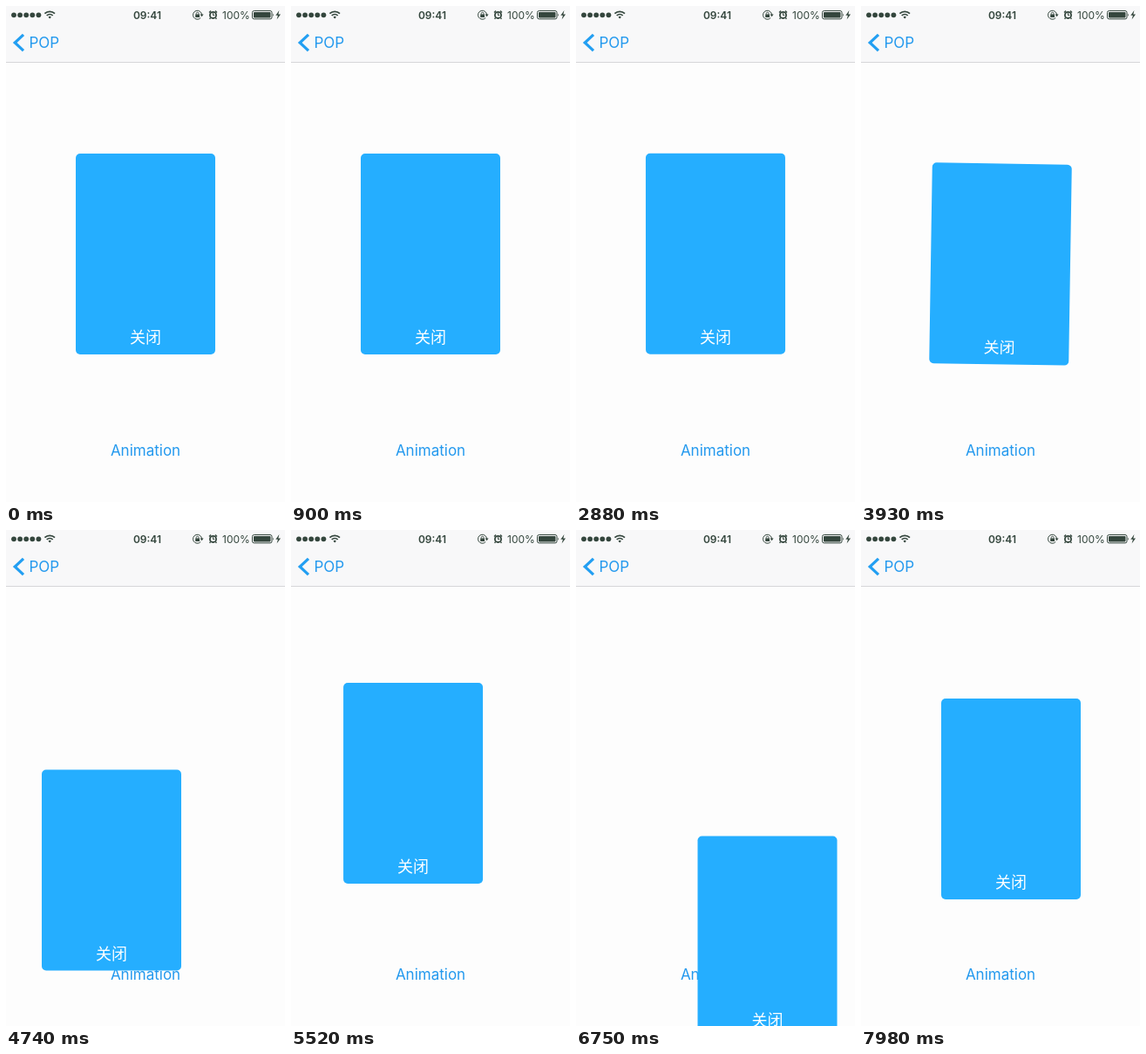
These frames come from a looping animation (320x568 px, 8 s). An HTML page:

```html
<!DOCTYPE html>
<html lang="zh">
<head>
<meta charset="utf-8">
<title>Spring card</title>
<style>
  html, body { margin: 0; width: 100%; height: 100%; overflow: hidden; background: #fdfdfd; }
  svg { display: block; width: 100vw; height: 100vh; }
  text { font-family: Inter, Roboto, sans-serif; }
  .link { font-size: 17px; fill: #2399ee; }
  .status { font-size: 12px; fill: #34463d; }
  .cjk { font: 300 18px "Noto Sans CJK SC", "Noto Sans CJK", sans-serif; fill: #fff; }
</style>
</head>
<body>
<svg viewBox="0 0 320 568">
  <defs>
    <clipPath id="bar"><rect width="320" height="64"/></clipPath>
    <filter id="blur" x="-30%" y="-30%" width="160%" height="160%"><feGaussianBlur stdDeviation="9"/></filter>
  </defs>
  <rect width="320" height="568" fill="#fdfdfd"/>
  <text class="link" x="160" y="514.6" text-anchor="middle">Animation</text>
  <g id="card">
    <rect x="-80" y="-115" width="160" height="230" rx="5" fill="#25aeff"/>
    <text class="cjk" x="0" y="102" text-anchor="middle">关闭</text>
  </g>

  <!-- translucent navigation bar -->
  <rect width="320" height="64" fill="#f8f8f9"/>
  <g clip-path="url(#bar)"><use href="#card" filter="url(#blur)" opacity=".25"/></g>
  <rect y="64" width="320" height="1" fill="#d6d6d8"/>
  <path d="M20 32.8 10.2 42 20 51.2" fill="none" stroke="#239ff2" stroke-width="3.2"/>
  <text class="link" x="26.5" y="48.2">POP</text>

  <!-- status bar -->
  <g id="dots" fill="#34463d"></g>
  <g fill="none" stroke="#34463d" stroke-width="1.7">
    <path d="M44.4 8.7a8.2 8.2 0 0 1 11.6 0M46.7 11a5 5 0 0 1 7 0"/>
    <path d="M50.2 14.6 48.5 12.7a2.4 2.4 0 0 1 3.4 0z" fill="#34463d" stroke="none"/>
    <path d="M223.2 13.6a5 5 0 1 1 1.3-3.4" stroke-width="1"/>
    <path d="M222.6 9.6h4l-2 2.6z" fill="#34463d" stroke="none"/>
    <rect x="217.2" y="9.5" width="4.8" height="3.5" fill="#34463d" stroke="none"/>
    <path d="M218.2 9.7v-1a1.4 1.4 0 0 1 2.8 0v1" stroke-width=".9"/>
    <circle cx="237.5" cy="10.4" r="3.6" stroke-width="1.8"/>
    <path d="M237.5 8v2.6h1.8" stroke-width="1"/>
    <path d="M233 7.6 235 5.6M242 7.6 240 5.6M234.6 13.4 233.6 15M240.4 13.4 241.4 15" stroke-width="1.4"/>
    <rect x="282.5" y="5.5" width="22.5" height="9.4" rx="2" stroke-width="1"/>
    <rect x="284" y="7" width="19.5" height="6.4" rx=".8" fill="#34463d" stroke="none"/>
    <path d="M306 8.5q1.6 1.7 0 3.4z" fill="#34463d" stroke="none"/>
    <path d="M313.4 5 309.3 10.8h2.6L310.6 15.4 315 9.4h-2.7z" fill="#34463d" stroke="none"/>
  </g>
  <text class="status" x="162" y="14.6" text-anchor="middle" font-weight="600">09:41</text>
  <text class="status" x="264" y="14.6" text-anchor="middle">100%</text>
</svg>
<script>
const LOOP = 8000, REST = { x: 160, y: 284 }, TRAVEL = 568, TILT = 45;
const card = document.getElementById('card');

document.getElementById('dots').innerHTML = [0, 1, 2, 3, 4]
  .map(i => `<circle cx="${9 + i * 7.1}" cy="10.3" r="2.9"/>`).join('');

// Each pair: the card leaves through the top, then drops back in.
const CLOSE_MS = 450;
const cycles = [[20, 440], [1760, 2330], [3120, 3627]];

// Finger path: time, x offset, y offset
const drag = [
  [4080, 0, 0], [4450, -26, 42], [4880, -42, 121], [5220, -34, 50], [5520, -20, 6],
  [5850, 8, 12], [6250, 32, 58], [6750, 59.5, 181.5], [7220, 40, 104], [7600, 24, 52], [7980, 12, 24],
];

const smooth = p => p * p * (3 - 2 * p);

// Remaining share of an underdamped spring's distance
function spring(ms) {
  const t = ms / 1000, damp = 0.76, w = 18.5;
  const root = Math.sqrt(1 - damp * damp), a = w * root * t;
  return Math.exp(-damp * w * t) * (Math.cos(a) + damp / root * Math.sin(a));
}

// Share of the way off stage
function away(t) {
  let share = 0;
  for (const [close, open] of cycles) {
    if (t >= open) share = spring(t - open);
    else if (t >= close) share = smooth(Math.min(1, (t - close) / CLOSE_MS));
  }
  return share;
}

function slope(i, k) {
  const a = drag[i - 1], b = drag[i + 1];
  return a && b ? (b[k] - a[k]) / (b[0] - a[0]) : 0;
}

function dragged(t, k) {
  if (t <= drag[0][0]) return 0;
  const i = drag.findIndex(d => d[0] >= t);
  if (i < 0) return drag[drag.length - 1][k];
  const a = drag[i - 1], b = drag[i], span = b[0] - a[0], p = (t - a[0]) / span, q = 1 - p;
  return a[k] * q * q * (1 + 2 * p) + b[k] * p * p * (3 - 2 * p)
    + span * p * q * (q * slope(i - 1, k) - p * slope(i, k));
}

function draw(t) {
  const share = away(t);
  const x = REST.x + dragged(t, 1);
  const y = REST.y + dragged(t, 2) - TRAVEL * share;
  card.setAttribute('transform', `translate(${x.toFixed(2)} ${y.toFixed(2)}) rotate(${(-TILT * share).toFixed(3)})`);
}

const start = performance.now();
function tick() {
  draw((performance.now() - start) % LOOP);
  requestAnimationFrame(tick);
}
draw(0);
tick();
</script>
</body>
</html>
```
